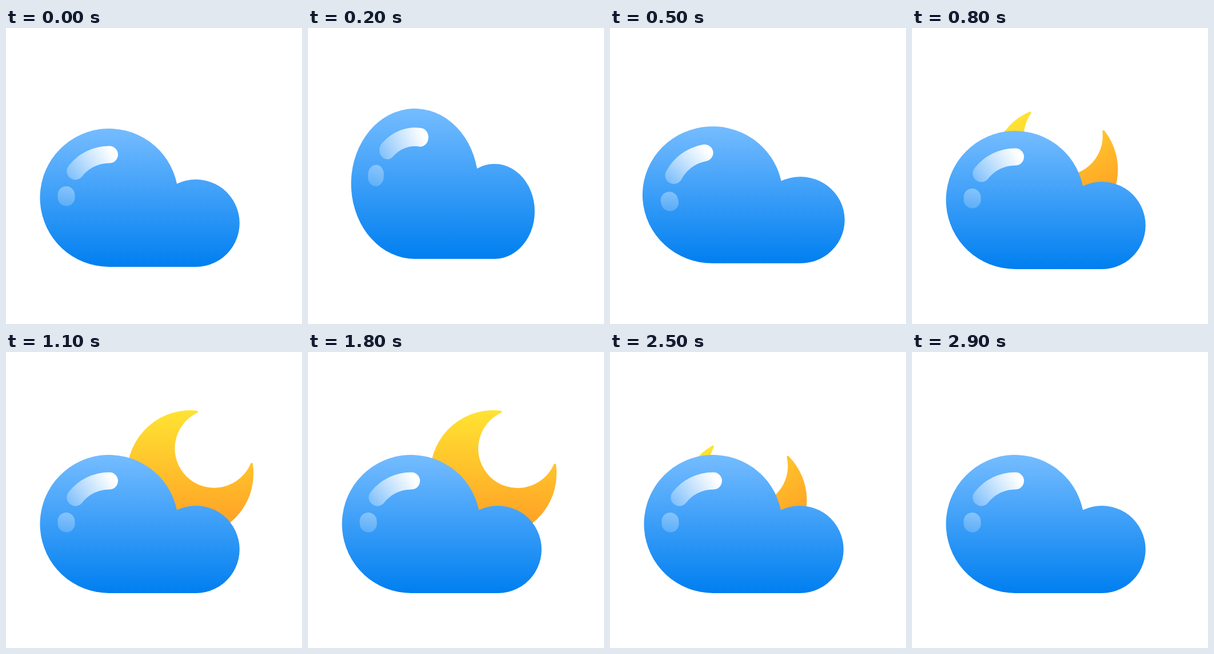
Write an HTML page that moves like this. It is 518x518 px and loops after 3000 ms.

```html
<!DOCTYPE html>
<html lang="en">
<head>
<meta charset="utf-8">
<title>Cloud and moon</title>
<style>
  html, body { margin: 0; width: 100%; height: 100%; overflow: hidden; background: #fff; }
  svg { display: block; width: 100vw; height: 100vh; }
</style>
</head>
<body>
<svg viewBox="0 0 518 518">
  <defs>
    <linearGradient id="sky" gradientUnits="userSpaceOnUse" x1="0" y1="180" x2="0" y2="422">
      <stop stop-color="#75bcff"/><stop offset="1" stop-color="#007ff0"/>
    </linearGradient>
    <linearGradient id="gold" gradientUnits="userSpaceOnUse" x1="0" y1="-110" x2="0" y2="110">
      <stop stop-color="#ffe332"/><stop offset="1" stop-color="#ff9a24"/>
    </linearGradient>
    <linearGradient id="gloss" gradientUnits="userSpaceOnUse" x1="186" y1="222" x2="112" y2="264">
      <stop stop-color="#fff"/><stop offset="1" stop-color="#fff" stop-opacity=".3"/>
    </linearGradient>
    <linearGradient id="glint" gradientUnits="userSpaceOnUse" x1="110" y1="281" x2="101" y2="315">
      <stop stop-color="#fff" stop-opacity=".36"/><stop offset="1" stop-color="#fff" stop-opacity=".2"/>
    </linearGradient>
  </defs>
  <path id="moon" fill="url(#gold)" stroke="url(#gold)" stroke-width="4" stroke-linejoin="round"
    d="M12.5-107.8A71 71 0 1 0 107.5-15A108.5 108.5 0 1 1 12.5-107.8Z"/>
  <g id="cloud">
    <path fill="url(#sky)" d="M180.5 422A121 121 0 1 1 299 276.6A76.5 76.5 0 1 1 332.5 422Z"/>
    <g id="shine" fill="none" stroke-width="30" stroke-linecap="round">
      <path stroke="url(#gloss)" d="M121.3 254.5A75.5 75.5 0 0 1 181 225.5"/>
      <path stroke="url(#glint)" d="M105.4 296L105.6 300.5"/>
    </g>
  </g>
</svg>
<script>
  const LOOP = 3000, STEP = 100;
  const [moon, cloud, shine] = ['moon', 'cloud', 'shine'].map(id => document.getElementById(id));

  // Hop, one row per step: lift, scale x, scale y, shine angle
  const hop = [
    [-4, 1, 1, 0],
    [-16, .96, 1.04, 3],
    [-28.5, .92, 1.087, 8],
    [-26, .96, 1.04, 5],
    [-18, 1.025, .975, -4],
    [-9, 1.013, .99, -11],
    [-3, 1.006, .996, -7],
    [0, 1, 1, -2]
  ];
  const rest = [0, 1, 1, 0];

  const ease = (t, from, to) => {
    const u = Math.min(1, Math.max(0, (t - from) / (to - from)));
    return (1 - Math.cos(Math.PI * u)) / 2;
  };

  function draw(t) {
    const [y, sx, sy, turn] = hop[t / STEP] || rest;
    cloud.setAttribute('transform',
      `translate(259 ${301 + y}) scale(${sx} ${sy}) translate(-259 -301)`);
    shine.setAttribute('transform', `rotate(${turn} 180.5 301)`);

    // 1 = tucked behind the cloud, 0 = fully out
    const hide = 1 - ease(t, 490, 1150) + ease(t, 2100, 2760);
    const mx = 324.5 - 136.5 * hide, my = 212.5 + 87.5 * hide ** 1.5;
    moon.setAttribute('transform', `translate(${mx} ${my}) rotate(${-55 * hide})`);
    moon.setAttribute('visibility', hide > .995 ? 'hidden' : 'visible');
  }

  const start = performance.now();
  function tick() {
    const t = (performance.now() - start) % LOOP;
    draw(Math.floor(t / STEP) * STEP);
    requestAnimationFrame(tick);
  }
  tick();
</script>
</body>
</html>
```
